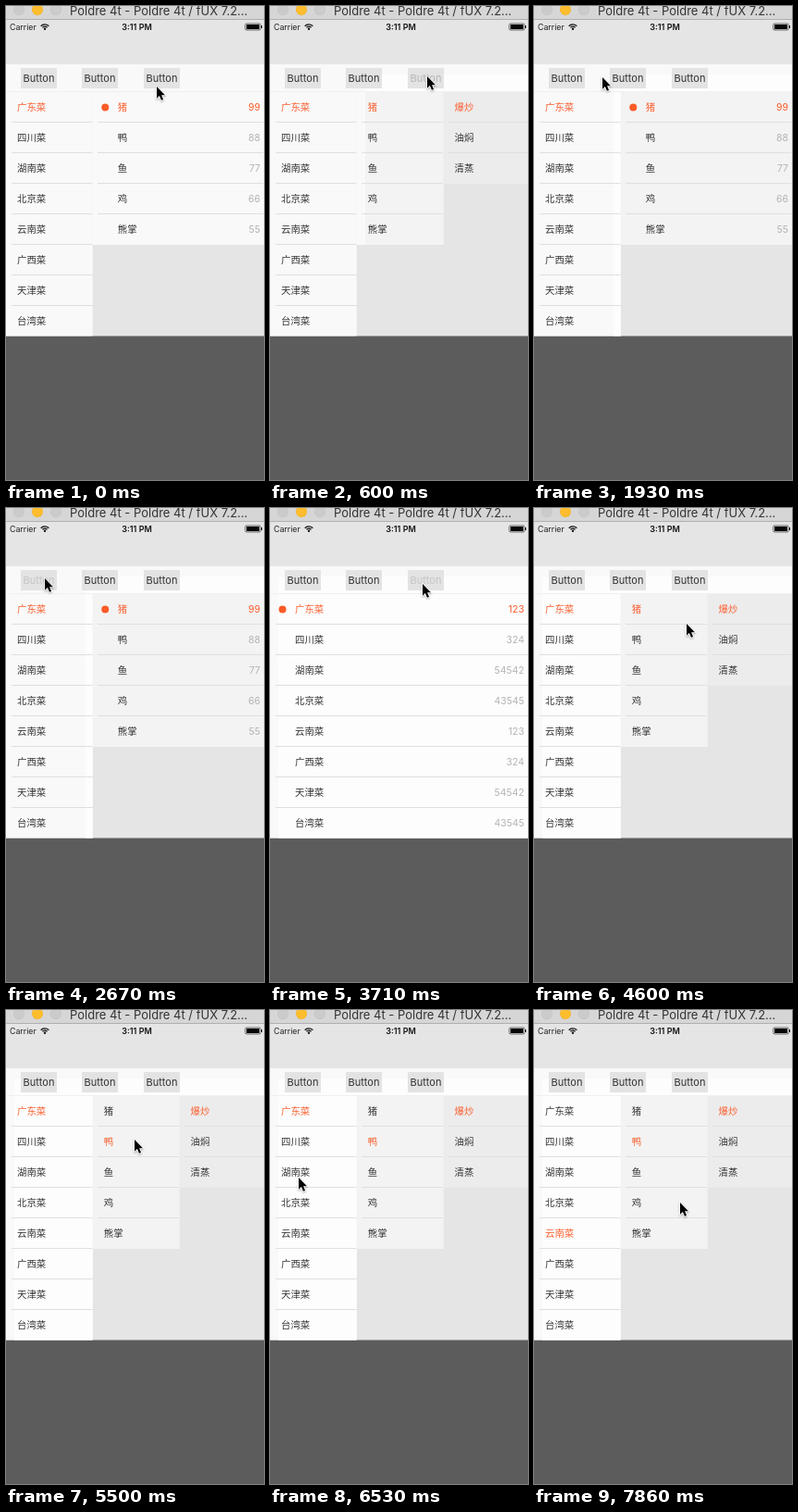
Animation, 279 px wide and 512 px high, one loop 8000 ms. Source, as an HTML page with a canvas:

```html
<!DOCTYPE html>
<html lang="zh">
<head>
<meta charset="utf-8">
<title>Menu demo</title>
<style>
html, body { margin: 0; width: 100%; height: 100%; overflow: hidden; background: #5c5c5c; }
canvas { display: block; width: 279px; height: 512px; }
</style>
</head>
<body>
<canvas id="stage" width="279" height="512"></canvas>
<script>
const ctx = document.getElementById('stage').getContext('2d');
const W = 279, LOOP = 8000, TICKS = 54;
const TOP = 93, ROW = 33, COL = 93.75, BOTTOM = 356.5;
const ORANGE = '#fa5f30', INK = '#333', PALE = '#b4b4b4';
const DARK = '#5c5c5c', PANEL = '#e5e5e5', LIGHT = '#f9f9f9', BRIGHT = '#fdfdfd';
const LATIN = 'Inter, "Liberation Sans", sans-serif';
const HAN = '"Noto Sans CJK SC", "Noto Sans CJK", "Noto Sans CJK JP", sans-serif';

const regions = ['广东菜', '四川菜', '湖南菜', '北京菜', '云南菜', '广西菜', '天津菜', '台湾菜'];
const regionCounts = ['123', '324', '54542', '43545'];
const meats = ['猪', '鸭', '鱼', '鸡', '熊掌'];
const meatCounts = meats.map((_, i) => String(99 - 11 * i));
const styles = ['爆炒', '油焖', '清蒸'];

// Pointer moves in ticks; a click takes effect on release, one tick after the press.
// edge: left side of the area that brightens when the menu repaints.
const home = { x: 163, y: 87 };
const moves = [
  { start: 0, end: 3, x: 170, y: 76, click: 4, button: 2, set: { levels: 3, edge: 103 } },
  { start: 7, end: 10, x: 92, y: 77, click: 11, button: 1, set: { levels: 2, edge: 86 } },
  { start: 11, end: 16, x: 42, y: 76, click: 19, button: 0, set: { levels: 1, edge: 9 } },
  { start: 19, end: 24, x: 165, y: 82, click: 26, button: 2, set: { levels: 3 } },
  { start: 27, end: 31, x: 165, y: 125 },
  { start: 32, end: 38, x: 137, y: 141, click: 37, set: { meat: 1 } },
  { start: 39, end: 44, x: 31, y: 181, click: 45, set: { region: 2 } },
  { start: 46, end: 49, x: 40, y: 229, click: 49, set: { region: 4 } },
  { start: 51, end: 53, x: 158, y: 208 }
];

const smooth = k => k * k * (3 - 2 * k);
const clamp = v => Math.max(0, Math.min(1, v));

function stateAt(tick) {
  const state = { levels: 2, edge: W, region: 0, meat: 0 };
  for (const m of moves) if (m.click <= tick) Object.assign(state, m.set);
  return state;
}

function pointerAt(tick) {
  let { x, y } = home;
  for (const m of moves) {
    const k = smooth(clamp((tick - m.start) / (m.end - m.start)));
    x += (m.x - x) * k;
    y += (m.y - y) * k;
  }
  return [Math.round(x), Math.round(y)];
}

// 1 while pressed, then a short fade
function highlight(button, tick) {
  return moves.filter(m => m.button === button && tick >= m.click - 1)
    .reduce((h, m) => Math.max(h, tick < m.click ? 1 : clamp(0.9 - (tick - m.click) * 0.45)), 0);
}

function rect(x, y, w, h, color) {
  ctx.fillStyle = color;
  ctx.fillRect(x, y, w, h);
}

function circle(x, y, r, color) {
  ctx.fillStyle = color;
  ctx.beginPath();
  ctx.arc(x, y, r, 0, Math.PI * 2);
  ctx.fill();
}

function text(str, x, y, font, color, align = 'left') {
  ctx.font = font;
  ctx.fillStyle = color;
  ctx.textAlign = align;
  ctx.fillText(str, x, y);
}

function drawStatusIcons() {
  ctx.strokeStyle = '#111';
  ctx.lineWidth = 1.3;
  for (const r of [3.4, 5.7]) {
    ctx.beginPath();
    ctx.arc(42, 25.5, r, -Math.PI * 0.77, -Math.PI * 0.23);
    ctx.stroke();
  }
  circle(42, 24.8, 1.2, '#111');

  ctx.lineWidth = 0.6;
  ctx.beginPath();
  ctx.roundRect(258.7, 19, 16.6, 7, 1.5);
  ctx.stroke();
  rect(260, 20, 14, 5, '#050505');
  rect(276, 21, 1, 3, '#111');
}

function drawChrome() {
  rect(0, 0, W, 512, DARK);
  rect(0, 14, W, BOTTOM - 14, PANEL);
  rect(0, 0, W, 14, '#d6d6d6');
  rect(0, 14, W, 1, '#b0b0b0');
  ['#cbcbcb', '#fdbd2e', '#cbcbcb'].forEach((color, i) => {
    circle(14 + i * 20, 4, 6, i === 1 ? '#f0b22d' : '#c0c0c0');
    circle(14 + i * 20, 4, 5.5, color);
  });
  text('Poldre 4t - Poldre 4t / fUX 7.2...', 69, 10, '13px ' + LATIN, INK);
  text('Carrier', 4, 26, '8.8px ' + LATIN, '#222');
  text('3:11 PM', 141.5, 26, '600 9px ' + LATIN, '#111', 'center');
  drawStatusIcons();
}

function drawButton(index, tick) {
  const x = Math.round(16 + index * 66.3);
  const v = Math.round(51 + highlight(index, tick) * 147);
  rect(x, 67, 39, 22, '#e3e3e3');
  text('Button', x + 19.5, 82, '11px ' + LATIN, `rgb(${v},${v},${v})`, 'center');
}

function drawColumn(x, w, items, { bg, selected, counts, from = x }) {
  rect(from, TOP, x + w - from, Math.min(items.length * ROW, BOTTOM - TOP), bg);
  items.forEach((name, i) => {
    const y = TOP + i * ROW, color = i === selected ? ORANGE : INK;
    if (i < items.length - 1) rect(Math.round(x + 5.6), y + 32, w - 6, 1, '#dfdfdf');
    text(name, x + (counts ? 27 : 12), y + 20, '10.4px ' + HAN, color);
    if (!counts) return;
    const countColor = i === selected ? ORANGE : PALE;
    text(counts[i % counts.length], 275, y + 20, '10.5px ' + LATIN, countColor, 'right');
    if (i === selected) circle(x + 13.5, y + 16.5, 4, '#fa5b28');
  });
}

function drawMenu(tick) {
  const { levels, edge, region, meat } = stateAt(tick);

  rect(0, 63, W, 30, LIGHT);
  rect(edge, 74, W - edge, 19, BRIGHT);
  rect(0, 92, W, 1, '#f0f0f0');
  for (let i = 0; i < 3; i++) drawButton(i, tick);

  const width = levels === 1 ? W : COL;
  rect(0, TOP, width, BOTTOM - TOP, LIGHT);
  drawColumn(0, width, regions, {
    bg: BRIGHT, from: Math.min(edge, width), selected: region,
    counts: levels === 1 ? regionCounts : null
  });

  const shade = edge === W ? LIGHT : '#f3f3f3';
  if (levels === 2) {
    drawColumn(COL, W - COL, meats, { bg: shade, selected: meat, counts: meatCounts });
  } else if (levels === 3) {
    rect(COL, TOP, COL, meats.length * ROW, LIGHT);
    drawColumn(COL, COL, meats, { bg: shade, from: Math.max(COL, edge), selected: meat });
    drawColumn(COL * 2, W - COL * 2, styles, { bg: '#ececec', selected: 0 });
  }
}

function drawPointer(x, y) {
  ctx.save();
  ctx.translate(x, y);
  ctx.scale(0.88, 0.88);
  ctx.beginPath();
  [[0, 0], [0, 14.5], [3.3, 11.5], [5.6, 16.8], [8, 15.8], [5.8, 10.6], [10.2, 10.4]]
    .forEach(([px, py]) => ctx.lineTo(px, py));
  ctx.closePath();
  ctx.lineJoin = 'round';
  ctx.shadowColor = 'rgba(0,0,0,.3)';
  ctx.shadowBlur = 2;
  ctx.shadowOffsetY = 1;
  ctx.strokeStyle = '#fff';
  ctx.lineWidth = 2;
  ctx.stroke();
  ctx.shadowColor = 'transparent';
  ctx.fillStyle = '#000';
  ctx.fill();
  ctx.restore();
}

function draw(now) {
  // The picture advances in even ticks, like a screen recording.
  const tick = Math.min(TICKS - 1, Math.floor((now % LOOP) / LOOP * TICKS + 0.05));
  drawChrome();
  drawMenu(tick);
  drawPointer(...pointerAt(tick));
}

const start = performance.now();
function loop() {
  draw(performance.now() - start);
  requestAnimationFrame(loop);
}
loop();
</script>
</body>
</html>
```
